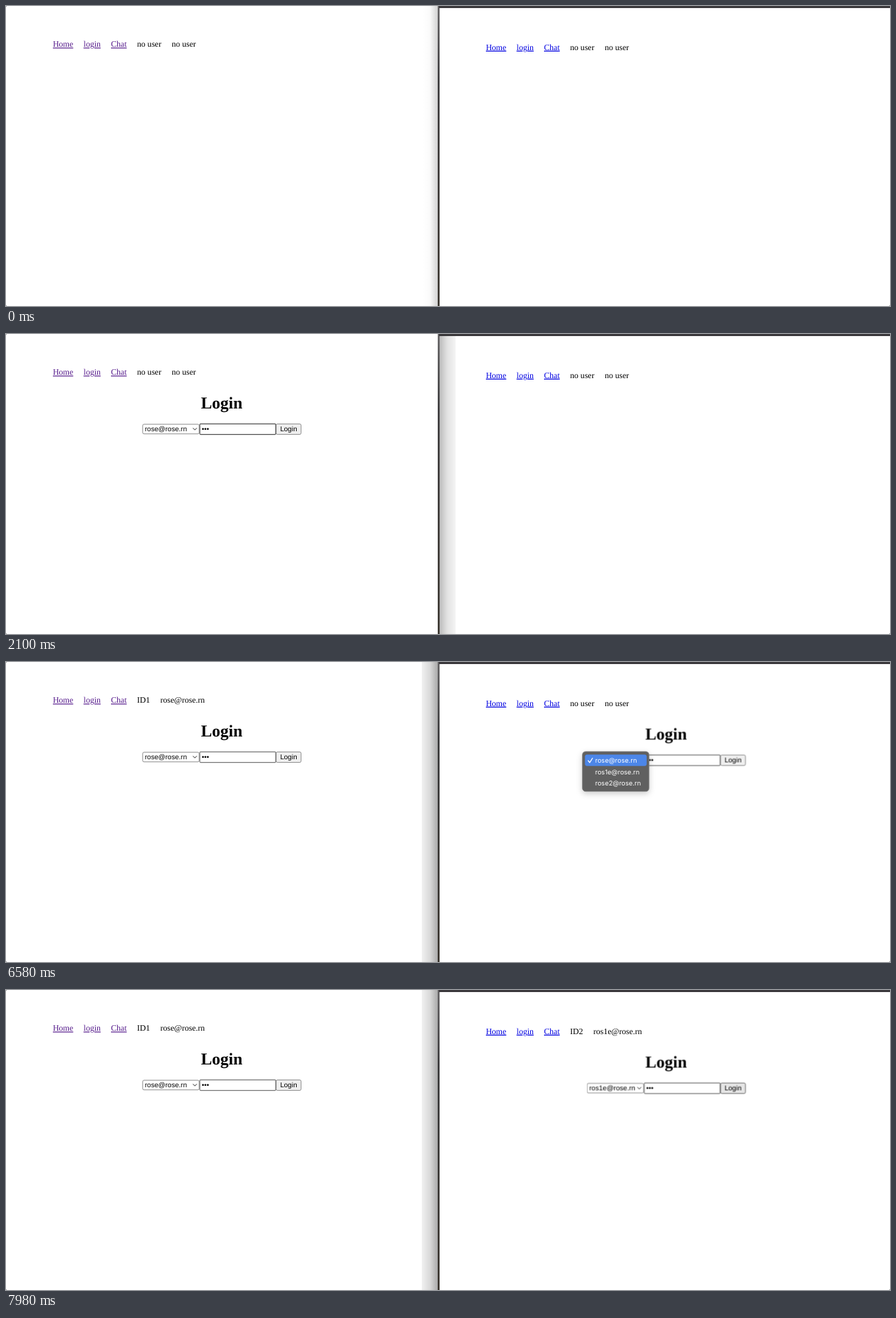
Write an HTML page that moves like this. It is 1280 px wide and 435 px high and loops after 8 s.

```html
<!DOCTYPE html>
<html lang="en">
<head>
<meta charset="utf-8">
<title>Two login windows</title>
<style>
  html, body { margin: 0; width: 100%; height: 100%; overflow: hidden; background: #fff; }
  svg { display: block; width: 100%; height: 100%; }
  text { white-space: pre; text-rendering: geometricPrecision; }
  .nav { font: 12.05px "Liberation Serif", "Times New Roman", serif; }
  .link { text-decoration: underline; }
  .title { font: bold 24.1px "Liberation Serif", "Times New Roman", serif; }
  .form { font: 10.06px "Liberation Sans", Arial, sans-serif; }
  .menu { font: 9.5px Inter, sans-serif; fill: #fff; }
  .popup { filter: drop-shadow(0 3px 4px rgba(0, 0, 0, .2)); }
</style>
</head>
<body>
<svg id="stage" viewBox="0 0 1280 435">
  <defs>
    <linearGradient id="softShade">
      <stop offset="0" stop-color="#fff"/>
      <stop offset=".45" stop-color="#fafafa"/>
      <stop offset="1" stop-color="#cfcfcf"/>
    </linearGradient>
    <linearGradient id="leftShade">
      <stop offset="0" stop-color="#f1f1f1"/>
      <stop offset=".5" stop-color="#d9d9d9"/>
      <stop offset="1" stop-color="#a6a6a6"/>
    </linearGradient>
    <linearGradient id="rightShade">
      <stop offset="0" stop-color="#b8b8b8"/>
      <stop offset=".5" stop-color="#e2e2e2"/>
      <stop offset="1" stop-color="#f4f4f4"/>
    </linearGradient>
    <linearGradient id="gap" x2="0" y2="1">
      <stop offset="0" stop-color="#5c5a5c"/>
      <stop offset=".25" stop-color="#2b2a2c"/>
      <stop offset="1" stop-color="#2a251e"/>
    </linearGradient>
  </defs>
</svg>
<script>
const LOOP = 8000;
const MAIL = ["rose@rose.rn", "ros1e@rose.rn", "rose2@rose.rn"];
const EDGE = "#767676", EDGE_HOVER = "#4f4f4f";
const stage = document.getElementById("stage");

function add(parent, tag, attrs = {}, content = "") {
  const el = document.createElementNS("http://www.w3.org/2000/svg", tag);
  for (const [name, value] of Object.entries(attrs)) el.setAttribute(name, value);
  el.textContent = content;
  parent.append(el);
  return el;
}

const box = (parent, x, y, width, height, attrs) =>
  add(parent, "rect", { x, y, width, height, ...attrs });
const label = (parent, x, y, content, attrs) => add(parent, "text", { x, y, ...attrs }, content);
const group = (parent, x = 0, y = 0, attrs) =>
  add(parent, "g", { transform: `translate(${x} ${y})`, ...attrs });

// Hard steps: each [ms, value] holds until the next one.
function hold(el, property, steps) {
  const frames = steps.map(([ms, value]) =>
    ({ offset: ms / LOOP, [property]: value, easing: "step-end" }));
  frames.push({ offset: 1, [property]: steps.at(-1)[1] });
  el.animate(frames, { duration: LOOP, iterations: Infinity });
}

const show = (el, from, to = LOOP) => hold(el, "opacity",
  [...(from ? [[0, 0]] : []), [from, 1], ...(to < LOOP ? [[to, 0]] : [])]);

function hover(el, spans) {
  hold(el, "stroke", [[0, EDGE],
    ...spans.flatMap(([from, to]) => [[from, EDGE_HOVER], [to, EDGE]])]);
}

function buildNav(x, y, { color, press, release, signIn, id, mail }) {
  const nav = group(stage, x, y, { class: "nav" });
  const link = (at, name) => label(nav, at, 59.3, name, { class: "link", fill: color });
  link(67.9, "Home");
  hold(link(112.3, "login"), "fill", [[0, color], [press, "#ee2a1c"], [release, color]]);
  link(152, "Chat");

  const guest = group(nav), member = group(nav);
  label(guest, 189.8, 59.3, "no user");
  label(guest, 240, 59.3, "no user");
  label(member, 189.8, 59.3, id);
  label(member, 223.5, 59.3, mail);
  show(guest, 0, signIn);
  show(member, signIn);
}

function buildLogin(x, y, { open, selectHover, fieldHover, button, picked }) {
  const page = group(stage, x, y);
  show(page, open);
  label(page, 312.3, 108, "Login", { class: "title", "text-anchor": "middle" });

  const form = group(page, 0, 0, { class: "form" });
  const edge = { fill: "#fff", stroke: EDGE };
  hover(box(form, 197.9, 130.9, 81.8, 13.9, { ...edge, rx: 2, "stroke-width": .85 }), selectHover);
  hover(box(form, 280.8, 130.4, 109.6, 15.2, { ...edge, rx: .8, "stroke-width": 1.1 }), fieldHover);
  const submit = box(form, 391.2, 130.4, 36, 15.2,
    { fill: "#efefef", stroke: EDGE, rx: 2, "stroke-width": .85 });
  const looks = { rest: ["#efefef", EDGE], hover: ["#e5e5e5", EDGE_HOVER], down: ["#f5f5f5", "#8d8d8d"] };
  ["fill", "stroke"].forEach((property, i) =>
    hold(submit, property, [[0, "rest"], ...button].map(([ms, look]) => [ms, looks[look][i]])));

  const first = label(form, 201, 141.4, MAIL[0]);
  if (picked) {
    show(first, 0, picked);
    show(label(form, 201, 141.4, MAIL[1]), picked);
  }
  add(form, "path", { d: "M270.8 136.3l2.7 2.9 2.7-2.9", fill: "none", stroke: "#222", "stroke-width": 1 });
  label(form, 283.4, 141.4, "•••");
  label(form, 396.9, 141.4, "Login");
}

function buildPopup() {
  const popup = group(stage, 0, 0, { class: "popup menu" });
  hold(popup, "opacity", [[0, 0], [6580, 1], [7420, .7], [7490, .3], [7560, 0]]);
  box(popup, 834.7, 129.9, 96.3, 57.7, { rx: 4.5, fill: "#606060", stroke: "#7c7c7c", "stroke-width": .9 });
  const highlight = y => box(popup, 838.3, y, 89.4, 16.6, { rx: 3, fill: "#4c86e8" });
  show(highlight(134.2), 6580, 6930);
  hold(highlight(150.8), "opacity", [[0, 0], [6930, 1], [7280, 0], [7350, 1]]);
  add(popup, "path", { d: "M843 143l2.2 2.8 4-6.3", fill: "none", stroke: "#fff",
    "stroke-width": 1.3, "stroke-linecap": "round", "stroke-linejoin": "round" });
  MAIL.forEach((mail, i) => label(popup, 853, 146 + i * 16.6, mail));
}

// Window edges and the shadow cast by whichever window is in front.
show(box(stage, 604, 0, 22, 435, { fill: "url(#softShade)" }), 0, 70);
show(box(stage, 602, 0, 24, 435, { fill: "url(#leftShade)" }), 5180);
show(box(stage, 627, 3, 24, 432, { fill: "url(#rightShade)" }), 70, 5180);
box(stage, 625.3, 0, 2.4, 435, { fill: "url(#gap)" });
box(stage, 627, 0, 653, 3, { fill: "#3a383b" });
[[0, 0], [0, 434], [1279, 434]].forEach(([x, y]) => box(stage, x, y, 1, 1, { fill: "#999" }));

buildNav(0, 0, { color: "#551a8b", press: 980, release: 1120, signIn: 2660, id: "ID1", mail: MAIL[0] });
buildLogin(0, 0, {
  open: 1120,
  selectHover: [[1890, 1960]],
  fieldHover: [[1540, 1890], [2100, 2240]],
  button: [[2240, "hover"], [2590, "down"], [2660, "hover"], [2870, "rest"]]
});

buildNav(627, 4.5, { color: "#0000e0", press: 5530, release: 5670, signIn: 7980, id: "ID2", mail: MAIL[1] });
buildLogin(643.5, 4.5, {
  open: 5670,
  selectHover: [[6300, 7700]],
  fieldHover: [[7700, 7770]],
  button: [[7770, "hover"], [7910, "down"], [7980, "hover"]],
  picked: 7350
});
buildPopup();
</script>
</body>
</html>
```
